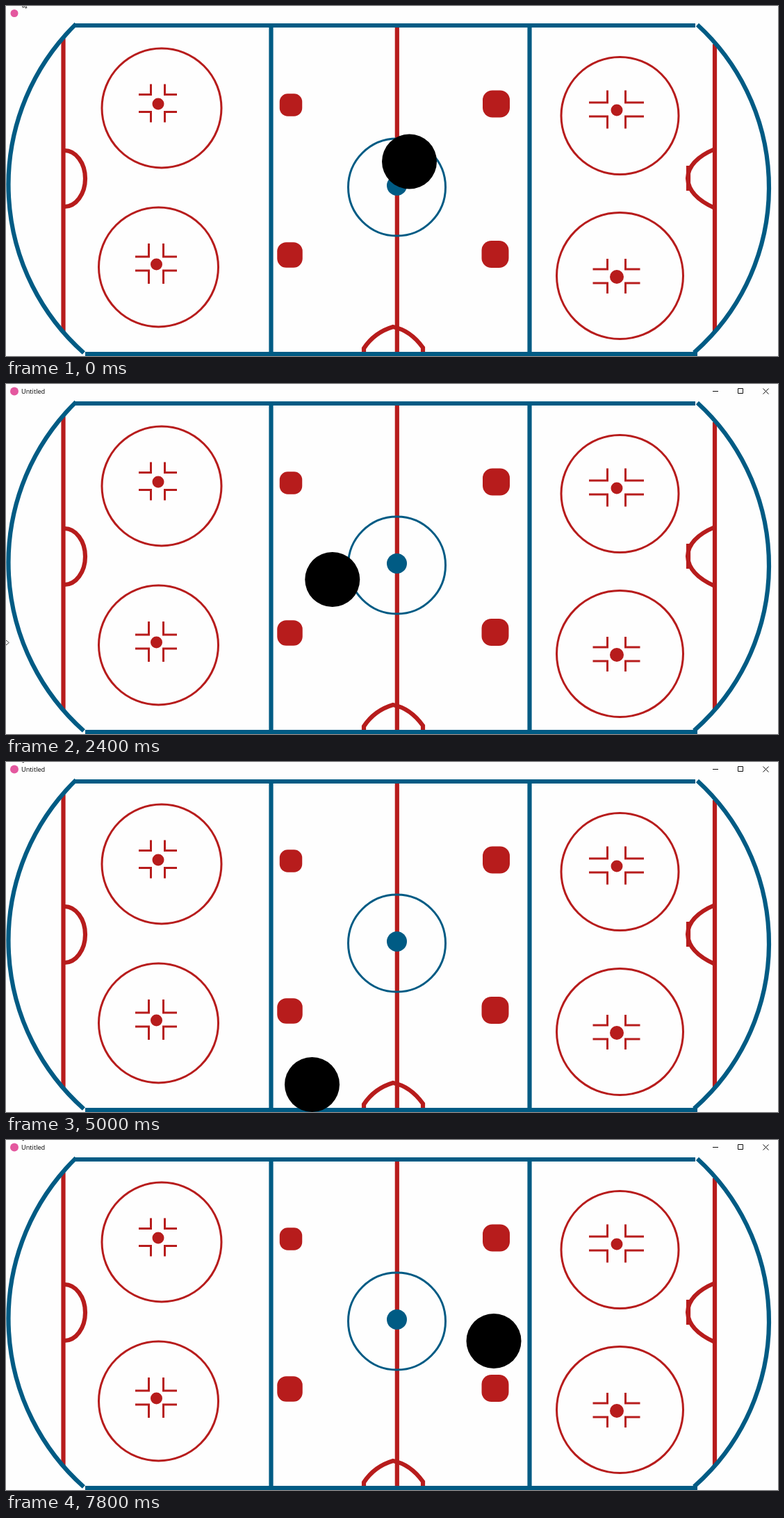
These frames come from a looping animation (1111 by 504 pixels, 8 s). An HTML page with a canvas:

```html
<!DOCTYPE html>
<html lang="en">
<head>
<meta charset="utf-8">
<title>Rink</title>
<style>
  html, body { margin: 0; width: 100%; height: 100%; overflow: hidden; background: #fefefe; }
  canvas { position: absolute; left: 0; top: 0; display: block; }
  #title {
    position: absolute; left: 22px; top: 4px; white-space: nowrap;
    font: 9.2px/13px "Open Sans", "Noto Sans", sans-serif; color: #000;
  }
</style>
</head>
<body>
<canvas id="stage" width="1111" height="504"></canvas>
<span id="title">Untitled</span>
<script>
const W = 1111, H = 504, LOOP = 8000, STEP = 200;
const RED = '#b71c1c', BLUE = '#005b84', ICE = '#fefefe';
const THIN = 3, THICK = 6.2;
const RESTART = 11;

const g = document.getElementById('stage').getContext('2d');
const title = document.getElementById('title');

function stroke(color, width, path) {
  g.strokeStyle = color;
  g.lineWidth = width;
  g.stroke(new Path2D(path));
}

function ring(color, width, x, y, r, from = 0, to = Math.PI * 2) {
  g.strokeStyle = color;
  g.lineWidth = width;
  g.beginPath();
  g.arc(x, y, r, from, to);
  g.stroke();
}

function disc(color, x, y, r) {
  g.fillStyle = color;
  g.beginPath();
  g.arc(x, y, r, 0, Math.PI * 2);
  g.fill();
}

function block(x, y, size) {
  g.fillStyle = RED;
  g.beginPath();
  g.roundRect(x - size / 2, y - size / 2, size, size, size * 0.36);
  g.fill();
}

// A dot between four L-shaped marks, mirrored about the centre
function spot(x, y, r, gapX, gapY, armX, armY) {
  for (const sx of [-1, 1]) {
    for (const sy of [-1, 1]) {
      stroke(RED, THIN, `M${x + sx * armX} ${y + sy * gapY}H${x + sx * gapX}V${y + sy * armY}`);
    }
  }
  disc(RED, x + 0.5, y + 1, r);
}

function drawRink() {
  g.fillStyle = ICE;
  g.fillRect(0, 0, W, H);

  ring(RED, THIN, 224, 147, 86);
  ring(RED, THIN, 219.5, 376, 86);
  ring(RED, THIN, 883.5, 158, 84.5);
  ring(RED, THIN, 883.5, 388.5, 91);
  spot(218.5, 140, 8.5, 10, 12.5, 27.5, 27.5);
  spot(216, 371, 8.5, 10.5, 10, 30, 29);
  spot(878.5, 149, 8.5, 13, 10, 39.5, 27.5);
  spot(878.5, 389, 10, 13, 10, 34, 25);

  block(410, 142.5, 32.5);
  block(705.5, 141, 39);
  block(408.5, 358.5, 36.5);
  block(704, 357.5, 39);

  stroke(RED, THICK, 'M82.5 47V469M1020 55V469M562.8 30V499');
  stroke(RED, THICK, 'M84 208A30 40.5 0 0 1 84 289');
  stroke(RED, THICK, 'M1020 206Q982 222 981 248Q982 274 1020 291M982 230V266');
  stroke(RED, THICK, 'M515 498V493Q530 470 557 462Q582 467 600 492V498');

  ring(BLUE, THIN, 562.5, 261, 70);
  disc(BLUE, 562.5, 258.5, 14.5);
  stroke(BLUE, THICK, 'M381.5 27V501M753.5 27V501M98 28H992M114 501H995');
  ring(BLUE, THICK, 328, 257.5, 324.5, Math.PI * 0.732, Math.PI * 1.253);
  ring(BLUE, THICK, 781, 261, 317, -0.83, 0.85);
}

// Reflects a coordinate between two walls
function fold(v, lo, hi) {
  const span = hi - lo;
  const m = (((v - lo) % (2 * span)) + 2 * span) % (2 * span);
  return lo + (m > span ? 2 * span - m : m);
}

// Distance covered sideways since the serve, with a short stall
const travel = [[11, -76], [17, 381.5], [18, 381.5], [25, 880.5], [31, 1318.5], [39, 1930]];

function distance(k) {
  const i = travel.findIndex(([step]) => step >= k) || 1;
  const [ka, da] = travel[i - 1], [kb, db] = travel[i];
  return da + (db - da) * (k - ka) / (kb - ka);
}

function puckAt(k) {
  if (k < RESTART) return [580.5 - 36.2 * k, 224 + 4.65 * k];
  const d = distance(k);
  return [fold(470 - d, 15, 1096), fold(281.5 + 0.2078 * d, 24, 486)];
}

function drawPointer(k) {
  let path = 'M23.5 0L24.5 1L26 0';
  if (k < 2) path = 'M23.5 0L24.5 2.5L26.5 .5L28 3L30 2.5L28.5 0';
  else if (k < RESTART || k === 13 || k === 14) return;
  else if (k <= 12) path = 'M0 369.5H1L4 372.5L1 375.5H0';
  stroke('#333', 1, path);
}

function draw(time) {
  const k = Math.floor((time % LOOP) / STEP);
  const open = k >= RESTART;
  drawRink();
  disc('#e4589f', 12, 10.5, open ? 6 : 5.5);
  if (open) stroke('#111', 1, 'M1017 10.5H1025M1053.5 6.5h7v7h-7zM1089.5 6.5l8 8M1097.5 6.5l-8 8');
  title.style.visibility = open ? 'visible' : 'hidden';
  disc('#000', ...puckAt(k), 39.5);
  drawPointer(k);
}

let start;
function tick(now) {
  start ??= now;
  draw(now - start);
  requestAnimationFrame(tick);
}

draw(0);
requestAnimationFrame(tick);
</script>
</body>
</html>
```
